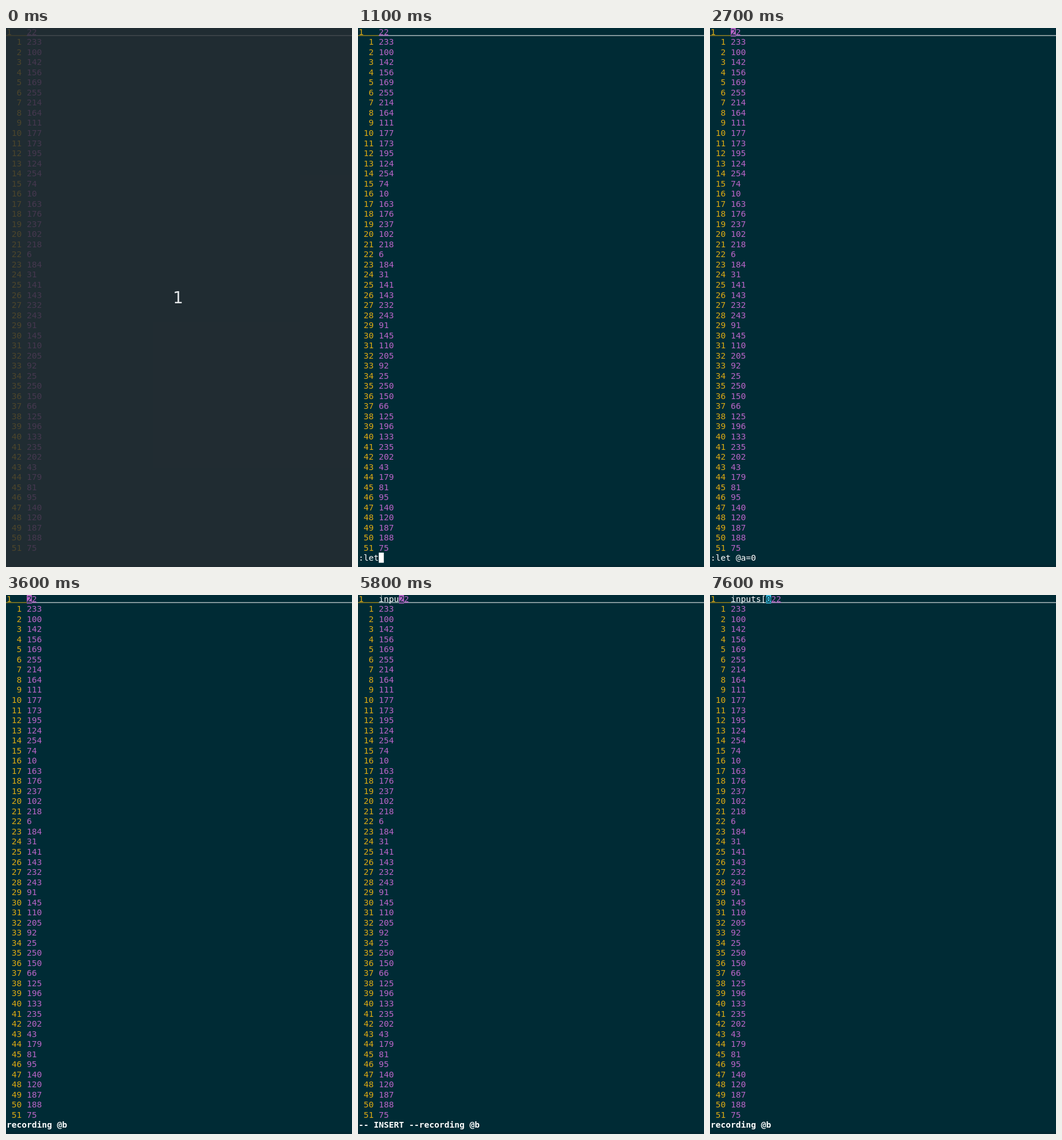
Animation, 600 px wide and 934 px high, one loop 8000 ms. Source, as an HTML page:

```html
<!DOCTYPE html>
<html lang="en">
<head>
<meta charset="utf-8">
<title>Editor macro</title>
<style>
  html, body { margin: 0; width: 100%; height: 100%; overflow: hidden; background: #002b35; }
  svg { display: block; width: 600px; height: 934px; }
  text { font: 14.54px "DejaVu Sans Mono", monospace; white-space: pre; }
  .bold { font-weight: bold; }
  #count { font: 28px "DejaVu Sans", sans-serif; }
</style>
</head>
<body>
<svg id="stage" viewBox="0 0 600 934"></svg>
<script>
const LOOP = 8000, CELL = 8.754, ROW = 17.533, LEFT = 1, TOP = -2.6, LAST = 52;
const BG = '#002b35', GOLD = '#dcaa14', PURPLE = '#b965c8', WHITE = '#ffffff', CYAN = '#3fc0e4';
const VALUES = [233, 100, 142, 156, 169, 255, 214, 164, 111, 177, 173, 195, 124, 254, 74, 10, 163,
  176, 237, 102, 218, 6, 184, 31, 141, 143, 232, 243, 91, 145, 110, 205, 92, 25, 250, 150, 66, 125,
  196, 133, 235, 202, 43, 179, 81, 95, 140, 120, 187, 188, 75];
const REC = 'recording @b', INS = '-- INSERT --' + REC;

// Each step overrides part of the state. cur: column of the cursor in the top line, -1 if hidden.
const STEPS = [
  [0, { typed: '', zero: '', cur: -1, cmd: '', prompt: false, veil: true }],
  [100, { veil: false }],
  [400, { cur: 0 }],
  [800, { cur: -1, cmd: ':', prompt: true }],
  [1000, { cmd: ':l' }],
  [1100, { cmd: ':let' }],
  [1200, { cmd: ':let ' }],
  [1800, { cmd: ':let @' }],
  [2000, { cmd: ':let @a' }],
  [2200, { cmd: ':let @a=' }],
  [2500, { cmd: ':let @a=0' }],
  [2700, { cur: 0, prompt: false }],
  [3200, { cur: -1 }],
  [3300, { cur: 0 }],
  [3600, { cmd: REC }],
  [4200, { cur: -1 }],
  [4400, { cur: 0 }],
  [4700, { cmd: INS }],
  [5300, { typed: 'i', cur: 1 }],
  [5400, { typed: 'in', cur: 2 }],
  [5800, { typed: 'inpu', cur: 4 }],
  [5900, { typed: 'inputs', cur: 6 }],
  [6100, { typed: 'inputs[', cur: 7 }],
  [6600, { cur: -1 }],
  [6800, { cur: 7 }],
  [6900, { cur: 6, cmd: REC }],
  [7600, { zero: '0', cur: 7 }]
];

const stage = document.getElementById('stage');
const colX = c => LEFT + c * CELL;
const rowY = r => TOP + r * ROW;

function add(tag, attrs) {
  const el = document.createElementNS('http://www.w3.org/2000/svg', tag);
  set(el, attrs);
  return stage.appendChild(el);
}
function set(el, attrs) {
  for (const k in attrs) el.setAttribute(k, attrs[k]);
}
function rect(x, y, width, height, fill) {
  return add('rect', { x, y, width, height, fill });
}
function write(str, col, row, fill) {
  const el = add('text', { x: colX(col), y: rowY(row) + 14.3, fill });
  el.textContent = str;
  return el;
}

rect(0, 0, 600, 934, BG);
rect(0, 930, 600, 4, '#022731');
rect(0, 12.6, 36, 1, GOLD);
rect(36, 12.6, 564, 1, WHITE);
write('1', 0, 0, GOLD);
VALUES.forEach((v, i) => {
  write(String(i + 1).padStart(3), 0, i + 1, GOLD);
  write(v, 4, i + 1, PURPLE);
});

const typed = write('', 4, 0, WHITE);
const zero = write('', 4, 0, CYAN);
const number = write('22', 4, 0, PURPLE);
const numberLine = rect(0, 12.6, CELL * 2, 1, PURPLE);
const block = rect(0, 0, CELL, 14.9, PURPLE);
const blockLine = rect(0, 12.6, CELL, 1, BG);
const under = write('', 4, 0, BG);
const cmd = write('', 0, LAST, WHITE);
const caret = rect(0, rowY(LAST), CELL, ROW, WHITE);
const veil = rect(0, 0, 600, 934, 'rgba(41,44,49,.8)');
const count = add('text', { id: 'count', x: 298.5, y: 477, fill: '#e4e8ea', 'text-anchor': 'middle' });
count.textContent = '1';

function show(el, on) {
  el.style.display = on ? '' : 'none';
}

function draw(s) {
  const head = s.typed.length, tail = head + s.zero.length;
  typed.textContent = s.typed;
  zero.textContent = s.zero;
  set(zero, { x: colX(4 + head) });
  set(number, { x: colX(4 + tail) });
  set(numberLine, { x: colX(4 + tail) });

  const x = colX(4 + Math.max(s.cur, 0));
  for (const el of [block, blockLine, under]) {
    set(el, { x });
    show(el, s.cur >= 0);
  }
  set(block, { fill: s.cur < head ? WHITE : s.cur < tail ? CYAN : PURPLE });
  under.textContent = (s.typed + s.zero + '22')[s.cur] || '';

  cmd.textContent = s.cmd;
  cmd.classList.toggle('bold', s.cmd.endsWith(REC));
  set(caret, { x: colX(s.cmd.length) });
  show(caret, s.prompt);
  show(veil, s.veil);
  show(count, s.veil);
}

const states = [];
STEPS.reduce((prev, [, change]) => {
  const next = { ...prev, ...change };
  states.push(next);
  return next;
}, {});

let shown = -1;
const start = performance.now();
function tick() {
  const t = (performance.now() - start) % LOOP;
  const i = STEPS.filter(([at]) => at <= t).length - 1;
  if (i !== shown) draw(states[shown = i]);
  requestAnimationFrame(tick);
}
tick();
</script>
</body>
</html>
```
